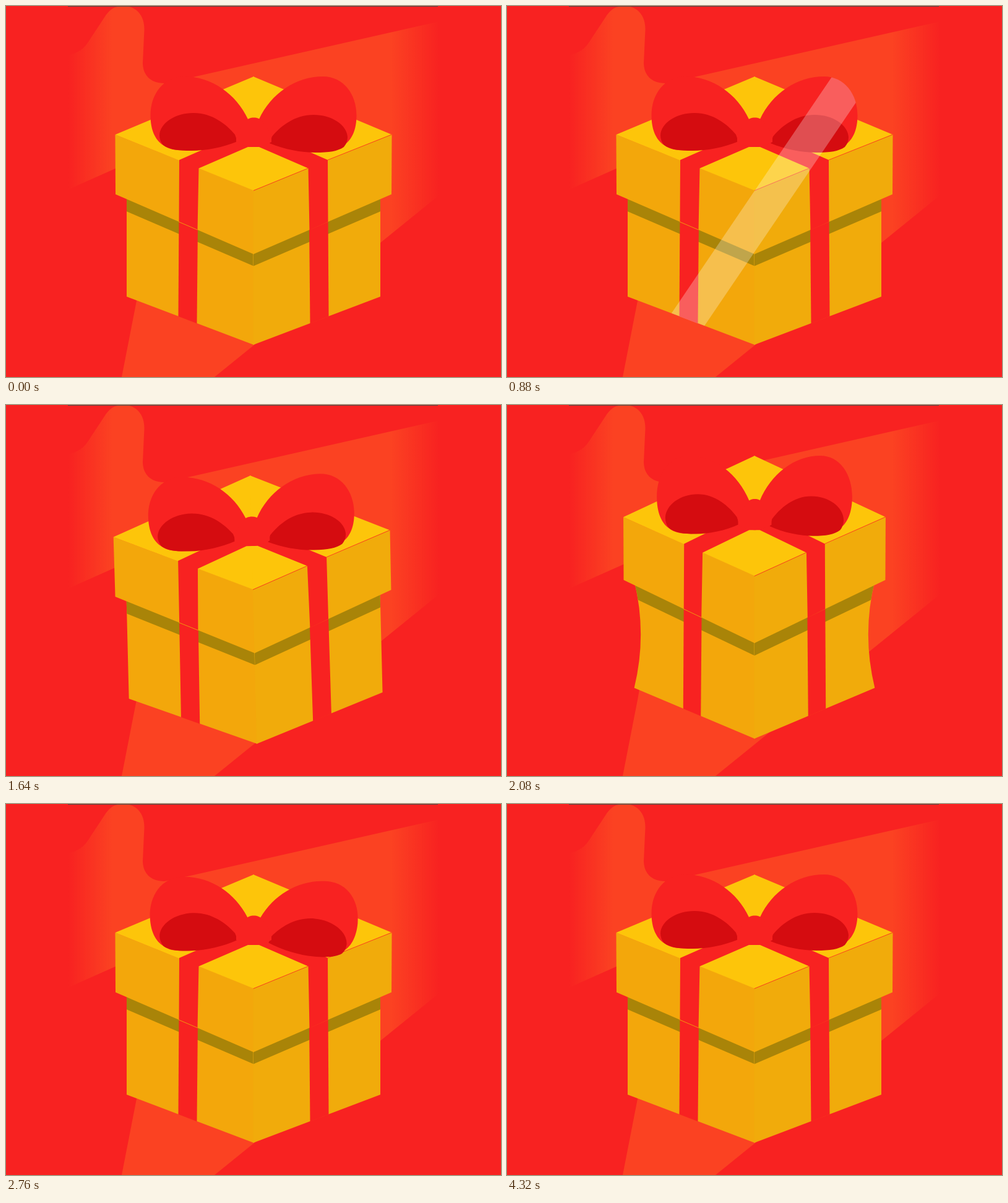
An HTML page with a canvas for the animation above (4.36 s loop, 800x600 px).

```html
<!DOCTYPE html>
<html lang="en">
<head>
<meta charset="utf-8">
<title>Gift box</title>
<style>
  html, body { margin: 0; width: 100%; height: 100%; overflow: hidden; background: #f82221; }
  canvas { display: block; }
</style>
</head>
<body>
<canvas id="stage" width="800" height="600"></canvas>
<script>
const ctx = document.getElementById('stage').getContext('2d');
const LOOP = 4360;
const RED = '#f82221', DARK = '#d50c10', TOP = '#fdc50a', LEFT = '#f3a70b', RIGHT = '#f1ab0b', SHADE = '#a98408';
const { sin, exp, PI } = Math;

// Progress from 0 to 1 between two times, plain and eased
const span = (t, from, to) => Math.min(1, Math.max(0, (t - from) / (to - from)));
const ease = (t, from, to) => {
  const u = span(t, from, to);
  return u * u * (3 - 2 * u);
};

// Motion of the gift: shake, squash and stretch, hop, then the bow swings out
const tilt = t => {
  const u = span(t, 1300, 1700);
  return 4 * sin(2 * PI * u) * sin(PI * u);
};
const width = t => 1 + .069 * sin(3 * PI * span(t, 1700, 2600));
const hop = t => -33 * sin(PI * span(t, 2060, 2320));
const droop = t => {
  const u = span(t, 2320, 3360);
  return 9.6 * (1 - u) * sin(6 * PI * u);
};

function fill(d, color) {
  ctx.fillStyle = color;
  ctx.fill(new Path2D(d));
}

function line(d, color) {
  ctx.strokeStyle = color;
  ctx.lineWidth = .8;
  ctx.stroke(new Path2D(d));
}

function turn(deg, x, y) {
  ctx.translate(x, y);
  ctx.rotate(deg * PI / 180);
  ctx.translate(-x, -y);
}

// Draws a left part, then its mirror image on the right
function bothSides(part) {
  for (const right of [false, true]) {
    ctx.save();
    if (right) {
      ctx.translate(800, 0);
      ctx.scale(-1, 1);
    }
    part(right);
    ctx.restore();
  }
}

function body(right, pinch) {
  ctx.save();
  ctx.clip(new Path2D(`M400.5,300 H195 V306 Q${195 + pinch},388 195,470 L400.5,548Z`));
  fill('M150,280H401V560H150Z', right ? RIGHT : LEFT);
  fill('M150,285 V313 L400,420.500 V285Z', SHADE);
  ctx.restore();
  fill('M279.500,340 L278.500,502 308.500,513.500 310,350Z', RED);
}

function lid(right) {
  fill('M176.500,208 L177,304.500 400.500,401.500 V298Z', right ? RIGHT : LEFT);
  fill('M400.500,114 L176.500,208 400.500,298.500Z', TOP);
  fill('M280,249 L279.500,349 309.500,362.500 311.500,262.500 391,228 H400.500 V196Z', RED);
  if (right) line('M400,298.500 L312,262.500 M280,249 L177,208', RED);
  else line('M279,349 L309.500,362', RIGHT);
}

function loop(right, t) {
  turn(-droop(right ? t : t - 77), 400, 205);
  fill('M391,183 C372,142 332,114 288,114 C254,114 233.500,143 233.500,177 C233.500,200 241,217 254,225 C264,233 278,234 300,233.500 C330,233 360,226 385,216Z', RED);
  if (right) ctx.translate(0, 3);
  fill('M248,209 C249,189 274,173 303,173 C333,173 356,191 370,208 Q372,214 374,219 C350,229 322,234 300,234 C278,234 264,232 254,225 Q248,218 248,209Z', DARK);
}

function gift(t) {
  const sx = width(t);
  ctx.save();
  ctx.translate(400, 548 + hop(t));
  ctx.scale(sx, 1 / sx);
  ctx.translate(-400, -548);
  turn(tilt(t), 400, 325);
  bothSides(right => body(right, (1 - sx) * 430));
  bothSides(lid);
  bothSides(right => loop(right, t));
  fill('M387,186 C393,178.500 408,178.500 414,186 L429,208 V220 Q400,236 372,220 V208Z', RED);
  ctx.restore();
}

// Slanted light band, visible only on the gift
function shine(t) {
  const x = 280 + 708 * ease(t, 580, 1180), shift = 600 * .678;
  ctx.globalCompositeOperation = 'source-atop';
  if (t > 580 && t < 1180) fill(`M${x - 33},0 h67 l${-shift},600 h-67Z`, 'rgba(255,255,255,.27)');
}

function backdrop() {
  ctx.globalCompositeOperation = 'destination-over';
  fill('M100,0H698V1H100Z', '#4c4846');
  const fade = ctx.createLinearGradient(100, 0, 700, 0);
  const clear = 'rgba(251,66,34,0)', orange = 'rgb(251,66,34)';
  fade.addColorStop(0, clear);
  fade.addColorStop(.12, orange);
  fade.addColorStop(.87, orange);
  fade.addColorStop(1, clear);
  fill('M100,80 C118,75 125,70 133,58 L158,20 C168,4 176,0 190,0 C211,0 224,16 223.500,38 L221,92 C221,111 233,125 256,125 L300,115.500 700,25 V306 L337,600 H187 L211,477 255,228 100,297Z', fade);
  fill('M0,0H800V600H0Z', RED);
  ctx.globalCompositeOperation = 'source-over';
}

function streak(t) {
  const tail = ease(t, 1315, 1460), head = ease(t, 1180, 1330);
  if (head <= tail) return;
  const point = u => [127 + 135 * u, 397.5 - 106 * u];
  const glow = ctx.createLinearGradient(...point(tail), ...point(head));
  glow.addColorStop(0, 'rgba(255,255,255,.6)');
  glow.addColorStop(.5, '#fff');
  ctx.strokeStyle = glow;
  ctx.lineWidth = 7;
  ctx.lineCap = 'round';
  ctx.beginPath();
  ctx.moveTo(...point(tail));
  ctx.lineTo(...point(head));
  ctx.stroke();
}

function draw() {
  const t = performance.now() % LOOP;
  ctx.clearRect(0, 0, 800, 600);
  gift(t);
  shine(t);
  backdrop();
  streak(t);
  requestAnimationFrame(draw);
}
draw();
</script>
</body>
</html>
```
